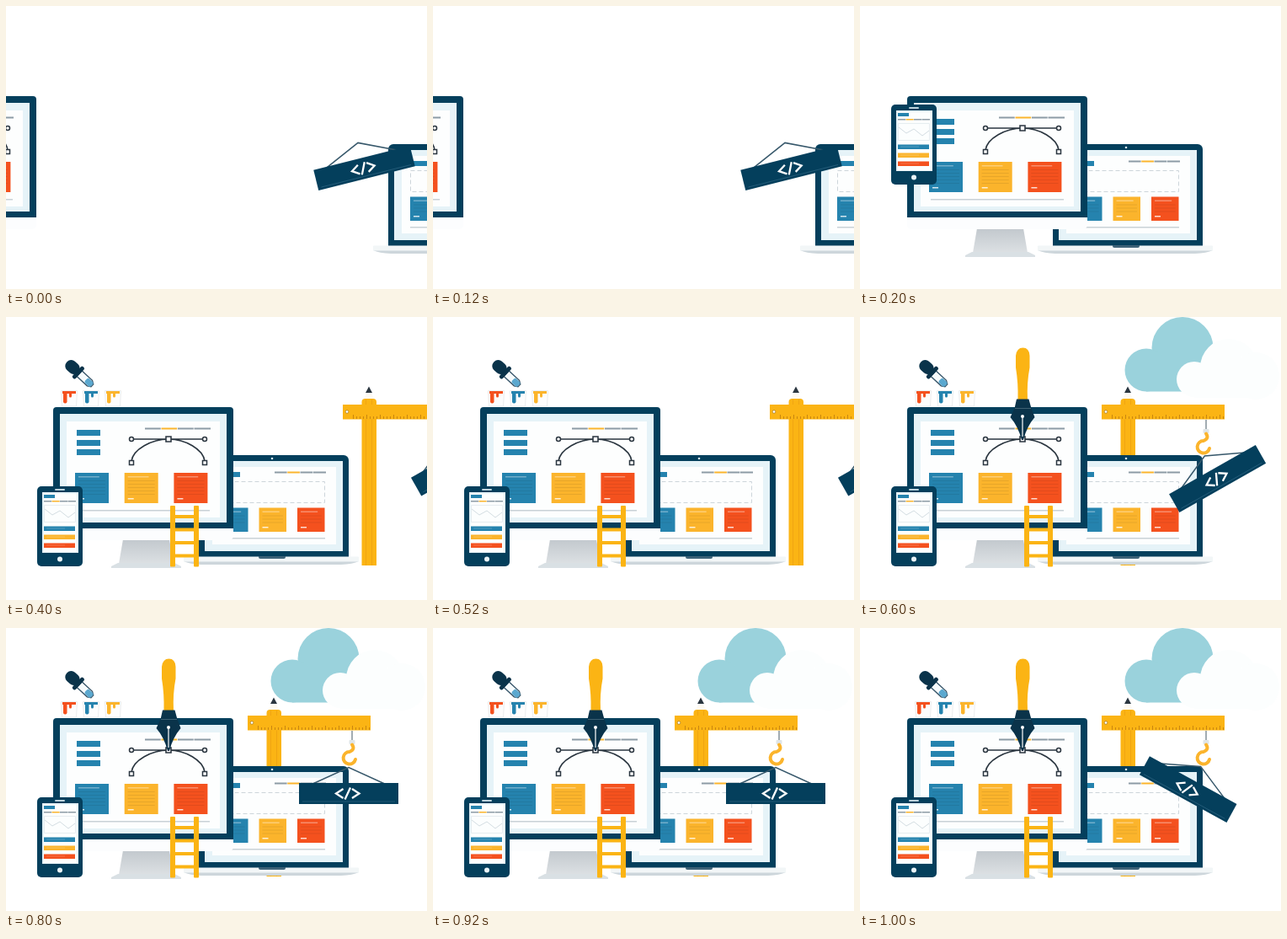
An HTML page with a canvas that plays this animation: 500x336 px, repeating every 1200 ms.

```html
<!DOCTYPE html>
<html lang="en">
<head>
<meta charset="utf-8">
<title>Website under construction</title>
<style>
html, body { margin: 0; width: 100%; height: 100%; overflow: hidden; background: #fff; }
canvas { display: block; }
</style>
</head>
<body>
<canvas id="stage" width="500" height="336"></canvas>
<script>
const ctx = document.getElementById('stage').getContext('2d');
const NAVY = '#043f5c', DEEP = '#0a334a', BLUE = '#2583ae', YELLOW = '#fbb42c', RED = '#f4511e',
  GOLD = '#fbb414', PALE = '#e6f3f8', GREY = '#8d9ba5', INK = '#2b3640';

// Poses per 200 ms beat; null hides the part.
const STEP = 200;
const POSES = [
  { monitor: -234, laptop: 225, plank: [425.5, 192.5, -14] },
  { monitor: 0, laptop: 0, phone: 117 },
  { monitor: 0, laptop: 0, phone: 201, tools: true, crane: 113, plank: [538.5, 172.5, -29.5] },
  ...[[424.6, 192, -29.5], [407, 196.5, 0], [389.7, 191.6, 28.7]].map(plank =>
    ({ monitor: 0, laptop: 0, phone: 201, tools: true, crane: 0, pen: true, plank }))
];

function rect(x, y, w, h, fill, r = 0) {
  ctx.fillStyle = fill;
  ctx.beginPath();
  ctx.roundRect(x, y, w, h, r);
  ctx.fill();
}

function shape(d, fill, stroke, width = 1) {
  const path = new Path2D(d);
  if (fill) { ctx.fillStyle = fill; ctx.fill(path); }
  if (stroke) { ctx.strokeStyle = stroke; ctx.lineWidth = width; ctx.stroke(path); }
}

function disc(x, y, r, fill, stroke, width) {
  shape(`M${x - r} ${y}a${r} ${r} 0 1 0 ${2 * r} 0a${r} ${r} 0 1 0 ${-2 * r} 0`, fill, stroke, width);
}

function at(x, y, deg, draw) {
  ctx.save();
  ctx.translate(x, y);
  ctx.rotate(deg * Math.PI / 180);
  draw();
  ctx.restore();
}

function heading(x, y, w, h) {
  rect(x, y, w * .24, h, GREY);
  rect(x + w * .25, y, w * .24, h, YELLOW);
  rect(x + w * .5, y, w * .24, h, GREY);
  rect(x + w * .75, y, w * .25, h, GREY);
}

function card(x, y, w, h, color) {
  rect(x, y, w, h, color);
  ctx.globalAlpha = .35;
  rect(x + 4, y + 4, w * .62, 1.5, '#fff');
  ctx.globalAlpha = .08;
  for (let i = 9; i < h - 8; i += 4) rect(x + 4, y + i, w - 8, 1, '#000');
  ctx.globalAlpha = .8;
  rect(x + 4, y + h - 6, 7, 1.5, '#fff');
  ctx.globalAlpha = 1;
}

function monitor() {
  const metal = ctx.createLinearGradient(0, 265, 0, 294);
  metal.addColorStop(0, '#c3c9ce');
  metal.addColorStop(1, '#dde1e4');
  shape('M139 264H194L199 293H134Z', metal);
  shape('M125 296L133 292H200L208 296V298H125Z', '#d9e0e4');
  rect(56, 247, 214, 18, '#fcfdfe', [0, 0, 5, 5]);
  rect(56, 107, 214, 144, NAVY, [4, 4, 0, 0]);
  rect(64, 115, 198, 129, PALE);
  rect(72, 124, 182, 114, '#fdfefe');
  heading(165, 131.5, 78, 2);
  for (const y of [134, 146, 157]) rect(84, y, 28, 7, BLUE);
  [BLUE, YELLOW, RED].forEach((c, i) => card(82 + 58.7 * i, 185, 40, 36, c));
  rect(84, 229, 158, 1.5, '#c9d2d7');

  shape('M149 145H236M149 171C151 157 173 145 193 145S234 157 236 171', null, INK, 1.6);
  for (const x of [149, 236]) {
    disc(x, 145, 2.5, '#fff', INK, 1.5);
    shape(`M${x - 2.5} 170.5h5v5h-5z`, '#fff', INK, 1.5);
  }
  shape('M190 142h6v6h-6z', '#fff', INK, 1.6);
}

function laptop() {
  shape('M211 290H419Q412 293.5 398 294H232Q218 293.5 211 290Z', '#cdd6db');
  rect(211, 284.5, 208, 6, '#f2f6f7', 1);
  rect(229, 164, 178, 120.5, NAVY, [6, 6, 0, 0]);
  rect(236, 171, 164, 107, PALE);
  rect(245, 178, 147, 92, '#fdfefe');
  disc(316, 168, 1.3, '#d8e7ee');
  rect(255, 184, 23, 6, BLUE);
  heading(319, 183.5, 61, 2);
  ctx.setLineDash([5, 3]);
  shape('M255.5 195.5H378.5V220.5H255.5Z', null, '#cdd5da');
  ctx.setLineDash([]);
  [BLUE, YELLOW, RED].forEach((c, i) => card(255 + 45.5 * i, 226.5, 32.5, 28.5, c));
  rect(255, 262, 124, 1.5, '#c9d2d7');
  rect(300, 284, 32, 3, '#3d6278', [0, 0, 2, 2]);
}

function phone() {
  rect(37, 0, 54, 95, NAVY, 5);
  rect(58, 3, 12, 2, '#bdd2dc', 1);
  rect(43, 7, 43, 72, PALE);
  rect(45, 9, 39, 69, '#fcfefe');
  rect(45, 10, 13, 4, BLUE);
  heading(45, 17, 38, 1.5);
  shape('M45.5 22.5H82.5V42.5H45.5Z', null, '#e6edf0');
  shape('M46 27L55 34L64 29L74 37L82 31', null, '#d3dde2');
  [BLUE, YELLOW, RED].forEach((c, i) => {
    rect(45, 47.5 + 10 * i, 37, 5.5, c);
    rect(48, 49.5 + 10 * i, 22, 1, '#ffffff30');
  });
  disc(64, 86.5, 3, '#e8f2f6');
}

function crane() {
  rect(309.5, 97, 17.5, 198, GOLD, [4, 4, 0, 0]);
  for (const x of [314, 321]) rect(x, 98, 1, 197, '#f0a512');
  shape('M312 97L316 89H320L324 97Z', '#fdf9f2');
  shape('M314 90L318 82.5L322 90Z', INK);
  rect(287, 104, 146, 17.5, GOLD);
  for (let i = 0; i < 34; i++) {
    const h = i % 4 ? 3 : 5;
    rect(299 + 4 * i, 121 - h, 1, h, '#c9860f');
  }
  disc(292, 112.5, 1.8, '#fff', '#a9812c', .8);
  shape('M411 122V136', null, '#8b979e', 1.6);
  rect(407.5, 133, 7, 5, '#dfe5e8', 1);
  ctx.lineCap = 'round';
  shape('M411 138.5Q415 144 408 147A7.3 7.3 0 1 0 415 156', null, YELLOW, 4);
  ctx.lineCap = 'butt';
}

function plank() {
  shape('M-46 -10L0 -31L46 -10', null, '#37586b', 1.5);
  rect(-59, -12.5, 118, 25, NAVY);
  shape('M-55 9.5H55', null, '#2c6380', .7);
  shape('M-6.5 -5.5L-15 0L-6.5 5.5M2 -7L-4.5 7M4 -5.5L12.5 0L4 5.5', null, '#fff', 2.3);
}

function cloud() {
  disc(383, 36.5, 36.5, '#9ad2dc');
  disc(340, 63, 25.5, '#9ad2dc');
  rect(340, 50, 58, 38.5, '#9ad2dc');
  for (const [x, y, r] of [[397, 74, 21], [438, 60, 34], [470, 70, 28]]) disc(x, y, r, '#fcfefe');
  rect(397, 72, 73, 24, '#fcfefe');
}

function pen() {
  shape('M187.5 98Q188 78 185 60V46Q186 36.5 193.5 36.5T201.5 46V60Q198 78 199 98Z', GOLD);
  shape('M186 97.5H200.5L203.5 108.5L207.5 119Q198 130 194 146H192Q188 130 178.5 119L183.5 108.5Z', DEEP);
  shape('M184 108.5H203', null, '#4b6c7d', .8);
  shape('M193 119V142', null, '#fff', 1.2);
  disc(193, 118, 2, '#fff');
}

function dropper() {
  shape('M0 -4.5H17L21 -2V2L17 4.5H0Z', '#f6fbfd', '#38566a', 1.4);
  rect(11, -3.5, 9.5, 7, '#5ba8cf', 2);
  rect(-20, -7, 18, 14, DEEP, 6.5);
  rect(-4, -9, 5, 18, DEEP, 2);
}

function tools() {
  at(87, 67, 43, dropper);
  [[65, RED], [91, BLUE], [117, YELLOW]].forEach(([x, color]) => {
    shape(`M${x + .5} 87.5h19l-1 18.5h-17z`, '#fdfdfd', '#ebedee');
    rect(x + 2, 88, 16, 3, color);
    rect(x + 3, 88, 4.5, 14.5, color, [0, 0, 2, 2]);
    rect(x + 10, 89, 3, 6.5, color, [0, 0, 2, 2]);
  });
  for (const x of [195, 223]) rect(x, 224, 6, 72.5, GOLD, 1);
  for (let i = 0; i < 4; i++) rect(199, 235 + 15.5 * i, 26, 4, GOLD);
}

function draw(pose) {
  ctx.fillStyle = '#fff';
  ctx.fillRect(0, 0, 500, 336);
  if (pose.pen) cloud();
  if (pose.crane != null) at(pose.crane, 0, 0, crane);
  at(pose.laptop, 0, 0, laptop);
  at(pose.monitor, 0, 0, monitor);
  if (pose.tools) tools();
  if (pose.pen) pen();
  if (pose.phone) at(0, pose.phone, 0, phone);
  if (pose.plank) at(...pose.plank, plank);
}

function tick() {
  draw(POSES[Math.floor(performance.now() / STEP) % POSES.length]);
  requestAnimationFrame(tick);
}
tick();
</script>
</body>
</html>
```
